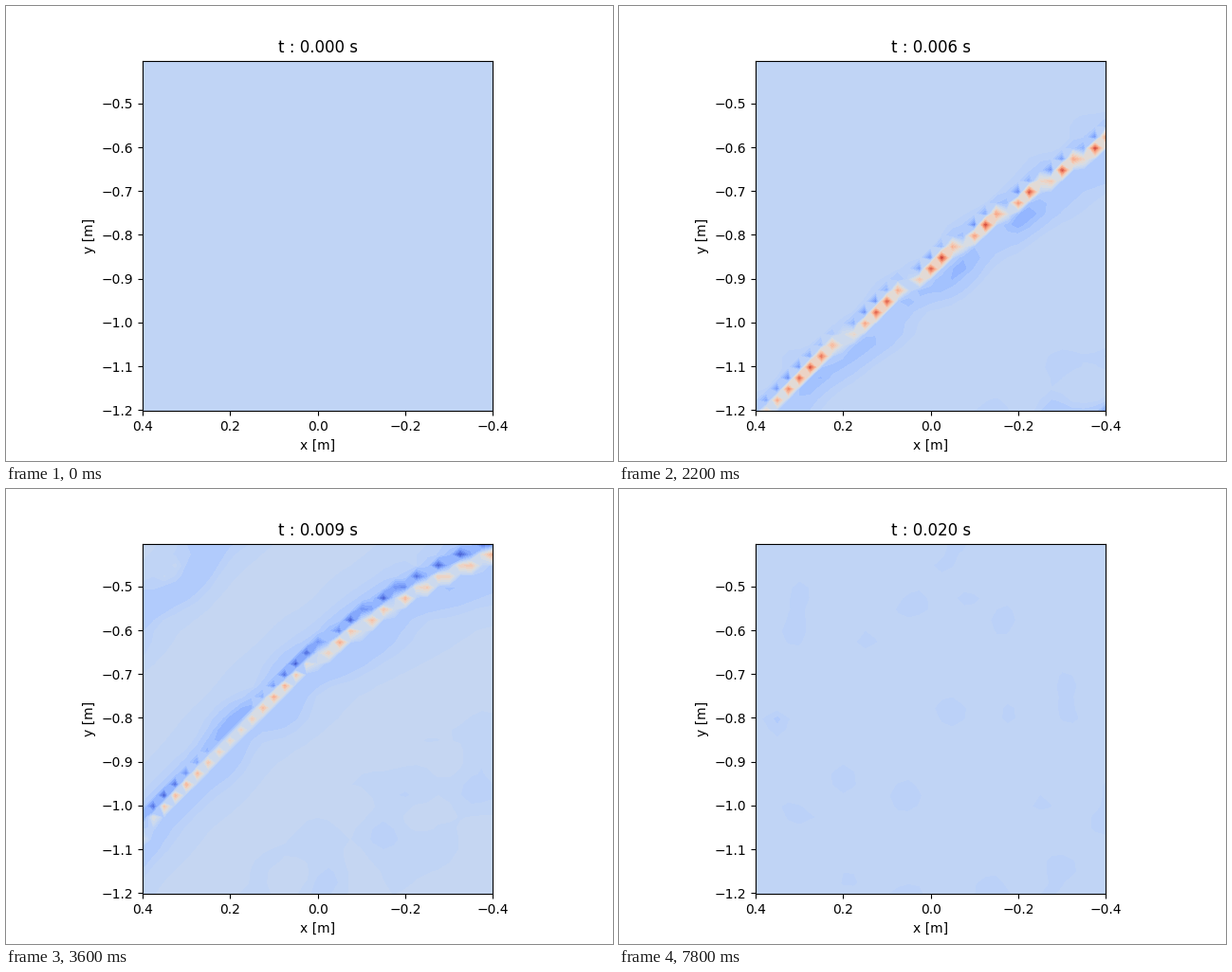
These frames come from a looping animation (640 by 480 pixels, 8000 ms). A matplotlib script:

```python
import numpy as np
import matplotlib.pyplot as plt
from matplotlib.animation import FuncAnimation

FRAMES, INTERVAL = 40, 200
REST = .4                       # colour value of the calm medium
N = 33                          # nodes per side of the coarse grid
SIDE = 369.6                    # plot side in pixels
CELL = SIDE / (N - 1)

# Even colour steps, with finer ones around the calm value
steps = np.linspace(0, 1, 25)
LEVELS = np.concatenate([steps[steps < .34], REST + .0155 * np.arange(-1.5, 2),
                         steps[steps > .45]])

px, py = np.meshgrid(143.2 + CELL * np.arange(N), 57.6 + CELL * np.arange(N))
dx = px - 328
xm = .4 - .8 * (px - 143.2) / SIDE
ym = -.402 - .8 * (py - 57.6) / SIDE


def ease(frame, start, end):
    u = np.clip((frame - start) / (end - start), 0, 1)
    return u * u * (3 - 2 * u)


def bell(d, centre, width):
    return np.exp(-((d - centre) / width) ** 2)


def blob(cx, cy, wx, wy):
    return bell(px, cx, wx) * bell(py, cy, wy)


def ripples(seed, frame):
    """Smooth noise drifting towards the upper left."""
    rng = np.random.default_rng(seed)
    total = np.zeros_like(px)
    for _ in range(14):
        angle, k = rng.uniform(0, np.pi), rng.uniform(.04, .13)
        total += np.sin(k * (np.cos(angle) * (px + 22 * frame)
                             + np.sin(angle) * (py + 26 * frame))
                        + rng.uniform(0, 2 * np.pi))
    return total / 3.7


def front(y_mid, slope, bend):
    """Vertical distance of every node below a curved wave front."""
    return py - (y_mid - slope * dx + bend * dx ** 2)


def crest(d, red, blue, dip):
    """Ridge and trough thinner than a cell, so the grid breaks them up."""
    return red * bell(d, 1, 5) - blue * bell(d, dip, 4.6)


def skirt(d, grain, depth, centre, width):
    return depth * (1 + .3 * grain) * bell(d, centre, width)


def first_wave(frame, grain):
    d = front(274 - 48 * (frame - 11), .79 + .017 * max(0, frame - 11), .00035)
    fade = np.exp(-(frame - 7) / 12) * (1 - ease(frame, 14, 19))
    v = crest(d, .78 * fade, .38 * fade, -7)
    v -= .1 * fade * np.clip(grain + .3, 0, 1) * bell(d, 25, 10)
    return d, v - skirt(d, grain, .07 * (1 - ease(frame, 17, 22)), 18, 32)


def second_wave(frame, grain):
    bend = .00035 + .00075 * ease(frame, 14, 18)
    d = front(406 - 57 * (frame - 14), .8, bend)
    power = ease(frame, 8, 14) * (1 - ease(frame, 17, 23))
    v = crest(d, .36 * power, .38 * power, -13)
    return d, v - skirt(d, grain, .075 * power, 4, 40)


def remains():
    """Patches left near the left edge once the fronts have gone."""
    rng = np.random.default_rng(5)
    total = blob(174, 255, 10, 45) + blob(150, 62, 22, 18)
    for _ in range(6):
        total += blob(rng.uniform(150, 220), rng.uniform(140, 340), 8, 11)
    return np.minimum(total, 1)


def field(frame):
    v = np.full_like(px, REST + .014 * bell(frame, 15, 5))
    if frame < 5:
        return v
    grain = ripples(4, frame)
    d1, w1 = first_wave(frame, grain)
    d2, w2 = second_wave(frame, grain)
    v += w1 + w2

    # Weak echoes trailing the fronts
    echo = .016 * bell(frame, 14, 5)
    v -= echo * np.clip(ripples(2, frame), 0, 1.2) * (d1 < 0)
    v -= 2 * echo * np.clip(.5 + grain, 0, 1.5) * bell(
        d2, -70 + 305 * ease(frame, 14, 18), 50)

    v -= .036 * ease(frame, 20, 23) * (1 - ease(frame, 25, 28)) * remains()
    v -= .004 * ease(frame, 20, 24) * (1 + ripples(7, 0))
    v -= .04 * ease(frame, 26, 28) * blob(165, 246, 9, 7)
    v -= .04 * ease(frame, 33, 37) * blob(368, 116, 6, 6)
    return v


def draw(frame):
    ax.clear()
    ax.contourf(xm, ym, np.clip(field(frame), .001, .999), LEVELS,
                cmap="coolwarm", vmin=0, vmax=1)
    ax.set_aspect("equal")
    ax.set(xlim=(.4, -.4), ylim=(-1.202, -.402),
           xlabel="x [m]", ylabel="y [m]",
           xticks=np.linspace(.4, -.4, 5), yticks=np.linspace(-1.2, -.5, 8),
           title=f"t : 0.{(frame + 1) // 2:03d} s")
    return []


fig, ax = plt.subplots(figsize=(6.4, 4.8), dpi=100)
fig.subplots_adjust(left=.126, right=.901)
anim = FuncAnimation(fig, draw, frames=FRAMES, interval=INTERVAL,
                     repeat=True, repeat_delay=0)
plt.show()
```
